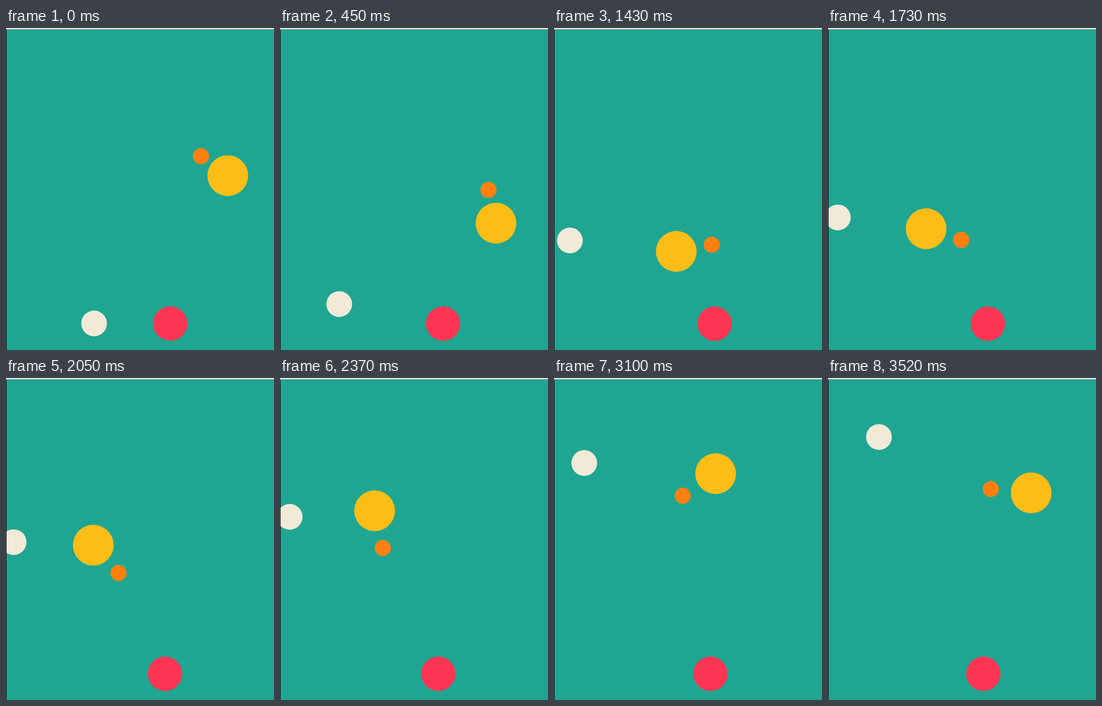
An HTML page for the animation above (3620 ms loop, 500x600 px).

```html
<!DOCTYPE html>
<html lang="en">
<head>
<meta charset="utf-8">
<title>Orbits</title>
<style>
  @property --turn {
    syntax: '<angle>';
    inherits: true;
    initial-value: 0deg;
  }

  html, body { margin: 0; width: 100%; height: 100%; overflow: hidden; background: #1ea693; }

  svg { display: block; animation: turn 3620ms linear infinite; }

  /* all planets share one clock; it starts slightly slow and rests at the end */
  @keyframes turn {
    0% { --turn: 0deg; }
    12.43% { --turn: 41deg; }
    97.24%, 100% { --turn: 328.05deg; }
  }

  circle {
    transform-origin: 0 0;
    transform:
      translate(290px, 305px)
      rotate(calc(var(--start) + var(--turn) * var(--speed)))
      translateX(var(--orbit));
  }

  .orange { --orbit: 99px; --start: -42deg; --speed: 0.9755; r: 15.1px; fill: #ff8010; }
  .yellow { --orbit: 127.3px; --start: -13.65deg; --speed: 1; r: 38px; fill: #fcbd17; }
  .pink { --orbit: 246.2px; --start: 86.2deg; --speed: 0.0117; r: 32.1px; fill: #ff3653; }
  .cream { --orbit: 275.8px; --start: 117.08deg; --speed: 0.329; r: 24px; fill: #f1ead7; }
</style>
</head>
<body>
<svg width="500" height="600" viewBox="0 0 500 600">
  <rect width="500" height="600" fill="#1ea693"/>
  <circle class="orange"/>
  <circle class="yellow"/>
  <circle class="pink"/>
  <circle class="cream"/>
  <rect width="1" height="600" fill="#000"/>
  <rect width="500" height="2" fill="#eee"/>
  <rect y="2" width="500" height="1" fill="#98a5a2"/>
</svg>
</body>
</html>
```
